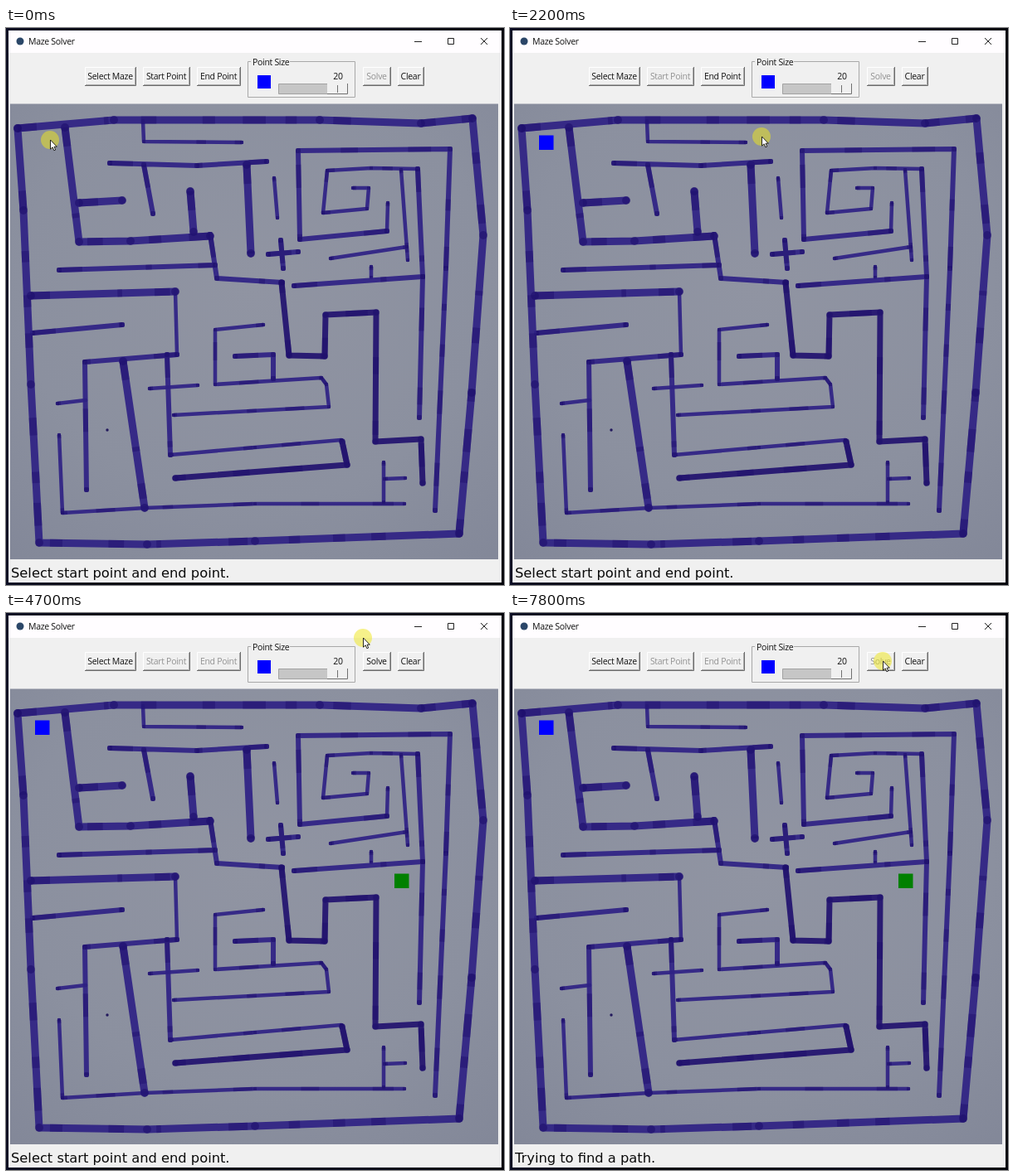
An HTML page for the animation above (8 s loop, 600 px wide and 672 px high).

```html
<!DOCTYPE html>
<html lang="en">
<head>
<meta charset="utf-8">
<title>Maze Solver</title>
<style>
html, body { margin: 0; width: 100%; height: 100%; overflow: hidden; background: #05060f; }
svg { display: block; }
text { font: 10.5px "Open Sans", "Noto Sans", sans-serif; letter-spacing: -.3px; fill: #111; }
.mid { text-anchor: middle; }
.off { fill: #929292; }
#status { font: 16.3px "DejaVu Sans", sans-serif; letter-spacing: 0; fill: #0a0a0a; }
#maze { fill: none; stroke-linecap: round; stroke-linejoin: round; }
.ink { stroke: #2f2285; stroke-opacity: .92; marker: url(#blot); }
.ink.hard { stroke: #22136f; }
.pool { stroke: #1e0f6c; stroke-opacity: .45; stroke-linecap: butt; }
</style>
</head>
<body>
<svg width="600" height="672" viewBox="0 0 600 672">
  <defs>
    <linearGradient id="desk"><stop stop-color="#0b0d24"/><stop offset=".3" stop-color="#04050c"/><stop offset=".7" stop-color="#090b1e"/><stop offset="1" stop-color="#04050d"/></linearGradient>
    <radialGradient id="paper" cx=".5" cy=".4" r=".8"><stop stop-color="#9094a2"/><stop offset=".6" stop-color="#8b909f"/><stop offset="1" stop-color="#828798"/></radialGradient>
    <marker id="blot" viewBox="-1 -1 2 2" markerWidth="1.1" markerHeight="1.1"><circle r="1" fill="#1e0f6c" fill-opacity=".6"/></marker>
  </defs>
  <rect width="600" height="672" fill="url(#desk)"/>
  <path fill="#f0f0f0" d="M3 3h594v666H3z"/>
  <path fill="#fffdff" d="M3 3h594v27H3z"/>
  <circle cx="17" cy="16" r="4.5" fill="#2b4668"/>
  <text x="27" y="20">Maze Solver</text>
  <path d="M492 16.5h9M532.5 12.5h7v7h-7zM572 12l8 8m0-8l-8 8" fill="none" stroke="#222"/>

  <g id="buttons"></g>
  <path d="M291.5 40.5h129v43h-129z" fill="none" stroke="#a8a8a8"/>
  <path d="M295 36h47v9h-47z" fill="#f0f0f0"/>
  <text x="297" y="44.5">Point Size</text>
  <path d="M303 57h16v16h-16z" fill="#00f"/>
  <text class="mid" x="400" y="62">20</text>
  <path d="M328.5 67.5h83v12h-83z" fill="#c6c6c6" stroke="#a2a2a2"/>
  <path d="M387 67h25v13h-25z" fill="#f0f0f0"/>
  <path d="M387 79.5h24.5V67M399.5 69v9" fill="none" stroke="#707070"/>

  <path d="M5 91.5h588V641H5z" fill="url(#paper)"/>
  <g id="maze">
    <path stroke-width="4.5" d="M165 112L166 137 284 138M323 181L327 229M460 211L459 245M418 193H437L435 218 382 223 387 172 440 169 496 170M476 171L484 280M391 278L483 264M440 288V301M204 318L206 394M62 453L96 449M64 491L68 585 168 579 300 574 480 574M173 435L231 431M198 515L300 506 404 497M202 467L389 457 386 430 380 422 252 430V364L310 358M455 524V572M456 544L481 543"/>
    <path stroke-width="6" d="M459 245L354 255 352 148 535 146 530 290 517 582M246 249L254 302 333 307M64 292L252 286M125 163L230 166 314 161M166 165L177 224M32 368L140 358M194 394L198 515M496 170L502 300 498 470M347 311L502 300M206 394L95 403 97 557M276 396L322 394V423M316 273L352 270M331 256L334 290"/>
    <path stroke-width="9" d="M14 121L130 111 378 111 500 115 562 109 575 250 561 440 546 610 300 619 170 623 40 621 30 430 21 220ZM71 120L88 258 150 257 246 251M88 211L140 208M222 197L226 246M290 165L295 272M30 323L204 318M141 402L167 579"/>
    <path class="hard" stroke-width="7" d="M332 307L341 395 384 396 385 346 446 343 445 499 500 496 502 549M204 543L411 527 405 499"/>
  </g>
  <circle cx="122" cy="485" r="1.7" fill="#22185c"/>
  <path id="start" d="M35 129.5h17.5V147H35z" fill="#00f"/>
  <path id="end" d="M468 314.500h17.500V332H468z" fill="#008000"/>
  <text id="status" x="6" y="663"></text>
  <g id="cursor">
    <circle r="11" fill="#eee61e" fill-opacity=".52"/>
    <path d="M.5 0V11.2L3.100 8.800 4.900 12.800 6.700 12 5 8.200H8.300Z" fill="#fff" stroke="#111" stroke-width=".9"/>
  </g>
</svg>
<script>
const $ = id => document.getElementById(id);

// Marker ink pools at irregular intervals along every wall.
let seed = 7;
const random = () => (seed = seed * 16807 % 2147483647) / 2147483647;
for (const wall of document.querySelectorAll("#maze path")) {
  const pool = wall.cloneNode();
  wall.classList.add("ink");
  pool.setAttribute("class", "pool");
  pool.setAttribute("stroke-dasharray",
    Array.from({ length: 20 }, (_, i) => i % 2 ? 20 + 70 * random() : 4 + 26 * random()));
  wall.after(pool);
}

const button = ([label, x, w]) => `
  <path d="M${x} 47h${w}v23h-${w}z" fill="#f0f0f0"/>
  <path d="M${x + .5} 69V47.5h${w - 1}" fill="none" stroke="#fff"/>
  <path d="M${x + 1} 68.5h${w - 2.5}V48" fill="none" stroke="#a8a8a8"/>
  <path d="M${x} 69.5h${w - .5}V47" fill="none" stroke="#6c6c6c"/>
  <text class="mid" x="${x + w / 2 - .5}" y="62">${label}</text>`;
$("buttons").innerHTML = [
  ["Select Maze", 95, 62], ["Start Point", 165, 57], ["End Point", 230, 53],
  ["Solve", 430, 34], ["Clear", 472, 32]
].map(button).join("");
const [, startText, endText, solveText] = document.querySelectorAll("#buttons text");

// Pointer moves: begin, end, x, y; it rests in between.
const moves = [
  [0, 300, 43, 138], [500, 800, 136, 111], [800, 1800, 246, 66], [2000, 2200, 303, 131],
  [2200, 3100, 457, 312], [3100, 3500, 476, 323], [4200, 4700, 430, 30], [4700, 5400, 449, 58]
];
function pointer(t) {
  let x = 53, y = 135;
  for (const [from, to, toX, toY] of moves) {
    const u = Math.min(Math.max((t - from) / (to - from), 0), 1);
    const k = Math.sin(u * Math.PI / 2);
    x += (toX - x) * k;
    y += (toY - y) * k;
  }
  return [x, y];
}

const show = (el, on) => el.setAttribute("visibility", on ? "visible" : "hidden");
const begin = performance.now();
function frame() {
  const t = Math.floor((performance.now() - begin) % 8000 / 100) * 100;
  const started = t >= 300, ended = t >= 3900, solving = t >= 5300;
  show($("start"), started);
  show($("end"), ended);
  startText.classList.toggle("off", started);
  endText.classList.toggle("off", ended);
  solveText.classList.toggle("off", !ended || solving);
  $("status").textContent = solving ? "Trying to find a path." : "Select start point and end point.";
  $("cursor").setAttribute("transform", `translate(${pointer(t)})`);
  requestAnimationFrame(frame);
}
frame();
</script>
</body>
</html>
```
